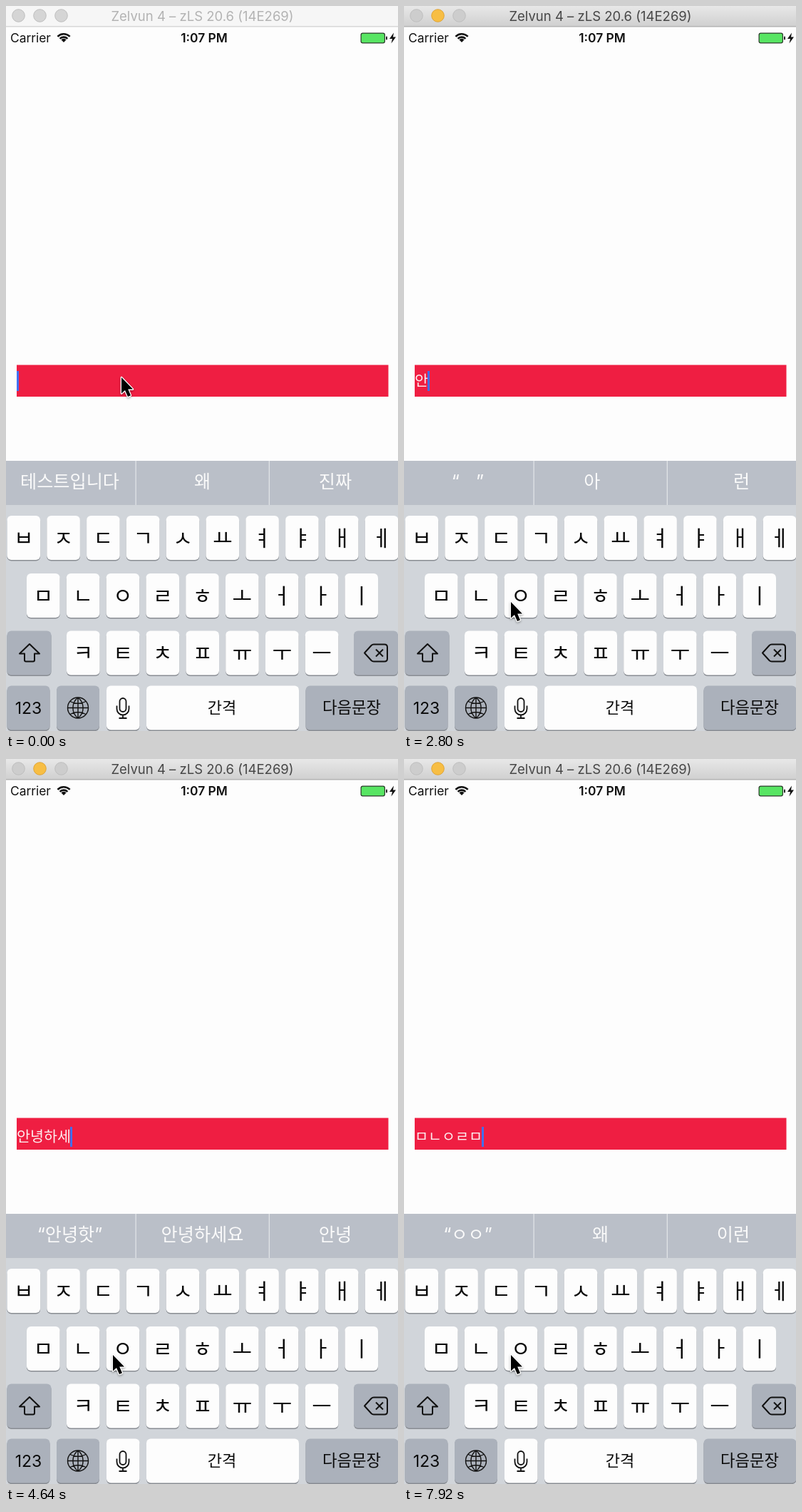
Write an HTML page with a canvas that moves like this. It is 550 by 1017 pixels and loops after 8 s.

```html
<!DOCTYPE html>
<html lang="ko">
<head>
<meta charset="utf-8">
<title>Keyboard input</title>
<style>
html, body { margin: 0; width: 100%; height: 100%; overflow: hidden; background: #fdfdfd; }
canvas { display: block; width: 550px; height: 1017px; }
</style>
</head>
<body>
<canvas id="stage" lang="ko"></canvas>
<script>
const W = 550, H = 1017, LOOP = 8000;
const canvas = document.getElementById('stage');
const ctx = canvas.getContext('2d');
const dpr = window.devicePixelRatio || 1;
canvas.width = W * dpr;
canvas.height = H * dpr;

const FONT = 'Inter, "Noto Sans CJK KR", "Noto Sans CJK", sans-serif';
const BLUE = '#426ff2', RED = '#ef1e42', KEY = '#fdfdfd', DARK = '#abb1bb';

// Each entry: start time, text in the field
const typed = [
  [0, ''], [1710, 'ㅇ'], [2400, '아'], [2640, '안'], [2960, '안ㄴ'], [3280, '안녀'],
  [3760, '안녕'], [4080, '안녕ㅎ'], [4240, '안녕하'], [4400, '안녕핫'],
  [4560, '안녕하세'], [4720, '안녕하셍'], [4880, '안녕하세요'], [5040, '안녕하세ㅇ'],
  [5120, '안녕하세'], [5200, '안녕하ㅅ'], [5280, '안녕하'], [5360, '안녕ㅎ'],
  [5600, '안녕'], [5760, '안녀'], [5920, '안ㄴ'], [6080, '안'], [6280, '아'],
  [6480, 'ㅇ'], [6640, ''], [7040, 'ㅁ'], [7200, 'ㅁㄴ'], [7360, 'ㅁㄴㅇ'],
  [7680, 'ㅁㄴㅇㄹ'], [7840, 'ㅁㄴㅇㄹㅁ']
];

// Suggestion slots: centre x and the texts they pass through
const MORPH = 120;
const slots = [
  { x: 89.5, steps: [
    [0, '테스트입니다'], [1900, '테스트입니'], [2010, '테스트입'], [2140, '테스'], [2260, '“ㅇ”'],
    [2560, '“아”'], [2800, '“안”'], [3440, '“안녀”'], [3850, '“안녕”'],
    [4240, '“안녕하”'], [4520, '“안녕핫”'], [4680, '“안녕하세”'], [4840, '“안녕하셍”'],
    [6080, '“안녕”'], [6200, '테스트'], [6320, '테스트입니다'],
    [7140, '테스트'], [7260, '“ㅇ”'], [7390, '“ㅇㅇ”']] },
  { x: 275.5, steps: [
    [0, '왜'], [2560, '아'], [2800, '아니'], [2920, '아니라고요'], [3440, '아니'],
    [3560, '녀'], [3850, '안녀'], [4000, '안녕'], [4240, '안녕하'], [4520, '안녕하세요'],
    [6080, '안녕'], [6240, '왜']] },
  { x: 462, steps: [
    [0, '진짜'], [2010, '이짜'], [2140, '이런'], [2800, '않런'], [2920, '않고'],
    [3440, '안고'], [3560, '안녕'], [3850, '안녕히'], [4520, '안녕'], [4680, ''],
    [6200, '진'], [6320, '진짜'], [7260, '이짜'], [7390, '이런']] }
];

const clamp = v => Math.max(0, Math.min(1, v));

function indexAt(steps, t) {
  let i = steps.length - 1;
  while (i > 0 && steps[i][0] > t) i--;
  return i;
}

function text(str, x, y, size, color, align = 'center', weight = 400) {
  ctx.font = `${weight} ${size}px ${FONT}`;
  ctx.textAlign = align;
  ctx.fillStyle = color;
  ctx.fillText(str, x, y);
}

// Hangul centred vertically on cy
const hangul = (str, x, cy, size, color, align) =>
  text(str, x, cy + size * 0.38, size, color, align);

function rect(x, y, w, h, color) {
  ctx.fillStyle = color;
  ctx.fillRect(x, y, w, h);
}

function round(x, y, w, h, r, color) {
  ctx.fillStyle = color;
  ctx.beginPath();
  ctx.roundRect(x, y, w, h, r);
  ctx.fill();
}

function shape(d, x, y, { fill, stroke, width = 2 }) {
  const path = new Path2D(d);
  ctx.save();
  ctx.translate(x, y);
  ctx.lineJoin = 'round';
  if (stroke) {
    ctx.strokeStyle = stroke;
    ctx.lineWidth = width;
    ctx.stroke(path);
  }
  if (fill) {
    ctx.fillStyle = fill;
    ctx.fill(path);
  }
  ctx.restore();
}

function titleBar(active) {
  const g = ctx.createLinearGradient(0, 0, 0, 28);
  g.addColorStop(0, active ? '#e8e8e8' : '#f6f6f6');
  g.addColorStop(1, active ? '#d0d0d0' : '#f6f6f6');
  rect(0, 0, W, 28, g);
  rect(0, 28, W, 1.5, active ? '#b4b4b4' : '#d8d8d8');
  [17.5, 47.5, 77.5].forEach((x, i) => {
    const lit = active && i === 1;
    ctx.beginPath();
    ctx.arc(x, 13.5, 8.8, 0, 7);
    ctx.fillStyle = lit ? '#f7be44' : active ? '#cdcdcd' : '#d5d5d5';
    ctx.fill();
    ctx.strokeStyle = lit ? '#dfa436' : '#bebebe';
    ctx.lineWidth = 1;
    ctx.stroke();
  });
  text('Zelvun 4 – zLS 20.6 (14E269)', 275.5, 20.7, 18.5, active ? '#474747' : '#b3b3b3');
}

function statusBar() {
  text('Carrier', 6, 51, 17.4, '#111', 'left');
  text('1:07 PM', 278, 51, 17.4, '#111', 'center', 600);
  ctx.strokeStyle = '#111';
  ctx.lineWidth = 2.6;
  for (const r of [7.4, 11.8]) {
    ctx.beginPath();
    ctx.arc(81, 51, r, -Math.PI * 0.76, -Math.PI * 0.24);
    ctx.stroke();
  }
  shape('M0 0 L-3.6 -3.7 A5 5 0 0 1 3.6 -3.7 Z', 81, 51, { fill: '#111' });
  round(497.5, 37.5, 34.5, 15, 3, '#2a3a2a');
  round(498.7, 38.7, 32.1, 12.6, 2, '#58e563');
  round(533, 42.5, 2, 5, 1, '#222');
  shape('M6 0 L0 8.5 H4 L2.5 15 L9 6 H5 Z', 538, 37.5, { fill: '#111' });
}

function key(x, y, w, color = KEY) {
  round(x, y + 1.6, w, 62, 6, '#898d93');
  round(x, y, w, 62, 6, color);
}

function keyboard() {
  rect(0, 638, W, H - 638, '#d1d5da');
  rect(0, 638, W, 62, '#babfc8');
  rect(181.5, 638, 1.3, 62, '#e0e3e7');
  rect(368.7, 638, 1.3, 62, '#e0e3e7');
  const rows = [['ㅂㅈㄷㄱㅅㅛㅕㅑㅐㅔ', 1.5, 715], ['ㅁㄴㅇㄹㅎㅗㅓㅏㅣ', 29, 796], ['ㅋㅌㅊㅍㅠㅜㅡ', 85, 876.5]];
  for (const [chars, x0, y] of rows) {
    [...chars].forEach((c, i) => {
      const x = x0 + i * 55.8;
      key(x, y, 46.6);
      hangul(c, x + 23.3, y + 30.5, 30, '#0a0a0a');
    });
  }
  key(1.5, 876.5, 62, DARK);
  key(488, 876.5, 62, DARK);
  key(1.5, 953.5, 60, DARK);
  key(71, 953.5, 60, DARK);
  key(141, 953.5, 46.5);
  key(197, 953.5, 214);
  key(420.5, 953.5, 130, DARK);
  text('123', 31.5, 993, 23, '#0a0a0a');
  hangul('간격', 303, 983.5, 22, '#0a0a0a');
  hangul('다음문장', 485, 983.5, 22.3, '#0a0a0a');
  icons();
}

function icons() {
  const line = { stroke: '#111', width: 2 };
  shape('M0 -12.5 L14 1 H7 V10 Q7 12 5 12 H-5 Q-7 12 -7 10 V1 H-14 Z', 33, 907.5, line);
  shape('M-16 0 L-6.5 -10.5 Q-5 -12 -3 -12 H12 Q16 -12 16 -8 V8 Q16 12 12 12 H-3 Q-5 12 -6.5 10.5 Z M0 -5 L10 5 M10 -5 L0 5', 519, 907.5, line);
  shape('M-14.5 0 A14.5 14.5 0 1 1 14.5 0 A14.5 14.5 0 1 1 -14.5 0 M0 -14.5 V14.5 M-14.5 0 H14.5 '
    + 'M0 -14.5 C-9.5 -7 -9.5 7 0 14.5 C9.5 7 9.5 -7 0 -14.5 M-11 -9 Q0 -3 11 -9 M-11 9 Q0 3 11 9',
    101, 984.5, { stroke: '#111', width: 1.4 });
  shape('M-4.5 -9 A4.5 4.5 0 0 1 4.5 -9 V1 A4.5 4.5 0 0 1 -4.5 1 Z M-8.5 -3 V1.5 A8.5 8.5 0 0 0 8.5 1.5 V-3 M0 10 V14.5 M-5.5 14.5 H5.5',
    164, 984.5, { stroke: '#111', width: 1.8 });
}

// Splits a change into kept head, removed part, added part and kept tail
function diff(from, to) {
  let a = 0, b = 0;
  const room = Math.min(from.length, to.length);
  while (a < room && from[a] === to[a]) a++;
  while (b < room - a && from[from.length - 1 - b] === to[to.length - 1 - b]) b++;
  return {
    head: to.slice(0, a),
    gone: from.slice(a, from.length - b),
    added: to.slice(a, to.length - b),
    tail: to.slice(to.length - b)
  };
}

function suggestion({ x, steps }, t) {
  const size = 25.2, cy = 666;
  const i = indexAt(steps, t);
  const p = i ? clamp((t - steps[i][0]) / MORPH) : 1;
  const to = steps[i][1];
  const d = diff(p < 1 ? steps[i - 1][1] : to, to);
  ctx.font = `400 ${size}px ${FONT}`;
  const cells = [];
  const add = (str, scale, alpha, room) => {
    for (const c of str) cells.push({ c, scale, alpha, w: ctx.measureText(c).width * room });
  };
  add(d.head, 1, 1, 1);
  if (d.added) add(d.added, 0.5 + 0.5 * p, p, 1);
  else add(d.gone, 1 - 0.4 * p, 1 - p, 1 - p);
  add(d.tail, 1, 1, 1);
  let cx = x - cells.reduce((sum, c) => sum + c.w, 0) / 2;
  for (const c of cells) {
    ctx.globalAlpha = c.alpha;
    hangul(c.c, cx + c.w / 2, cy, size * c.scale, '#fafafa');
    cx += c.w;
  }
  ctx.globalAlpha = 1;
}

function caretAlpha(since, first) {
  const p = (since + (first ? 0 : 560)) % 800;
  const fade = p < 480 ? 1 - clamp((p - 80) / 160) : clamp((p - 440) / 120);
  const held = first ? fade : since < 320 ? 1 : p < 80 ? 1 - clamp((p - 0) / 160) : fade;
  return !first && since < 60 ? Math.min(held, 0.7) : held;
}

function field(t) {
  rect(15, 503.5, 521.5, 44.5, RED);
  const i = indexAt(typed, t);
  const [start, str] = typed[i];
  const n = str.length;
  const drop = n > 1 ? 4 : 0;
  hangul(str, 15, 525.5 + drop, 20.65, '#fdeef0', 'left');
  // A lone first character fades its caret a little sooner
  const since = t - start;
  ctx.globalAlpha = i === 1 && since < 480 ? 1 - clamp((since - 320) / 160) : caretAlpha(since, i === 0);
  rect(n ? 14 + 19 * n : 15, 512 + drop, 3, 28, BLUE);
  ctx.globalAlpha = 1;
}

function pointer(t) {
  const u = clamp((t - 1280) / 420);
  const e = u * u * (3 - 2 * u);
  const d = 'M0 0 V22.5 L5 18 L9 27 L13 25.3 L9.2 16.6 H16 Z';
  ctx.save();
  ctx.shadowColor = 'rgba(0,0,0,.3)';
  ctx.shadowBlur = 3;
  ctx.shadowOffsetY = 1.5;
  shape(d, 162 - 12 * e, 521 + 315 * e, { stroke: '#fff', width: 2.6 });
  ctx.restore();
  shape(d, 162 - 12 * e, 521 + 315 * e, { fill: '#000' });
}

function draw(t) {
  ctx.setTransform(dpr, 0, 0, dpr, 0, 0);
  rect(0, 0, W, H, '#fdfdfd');
  titleBar(t >= 1680);
  statusBar();
  field(t);
  keyboard();
  for (const s of slots) suggestion(s, t);
  pointer(t);
}

const begin = performance.now();
function tick() {
  draw((performance.now() - begin) % LOOP);
  requestAnimationFrame(tick);
}
tick();
</script>
</body>
</html>
```
